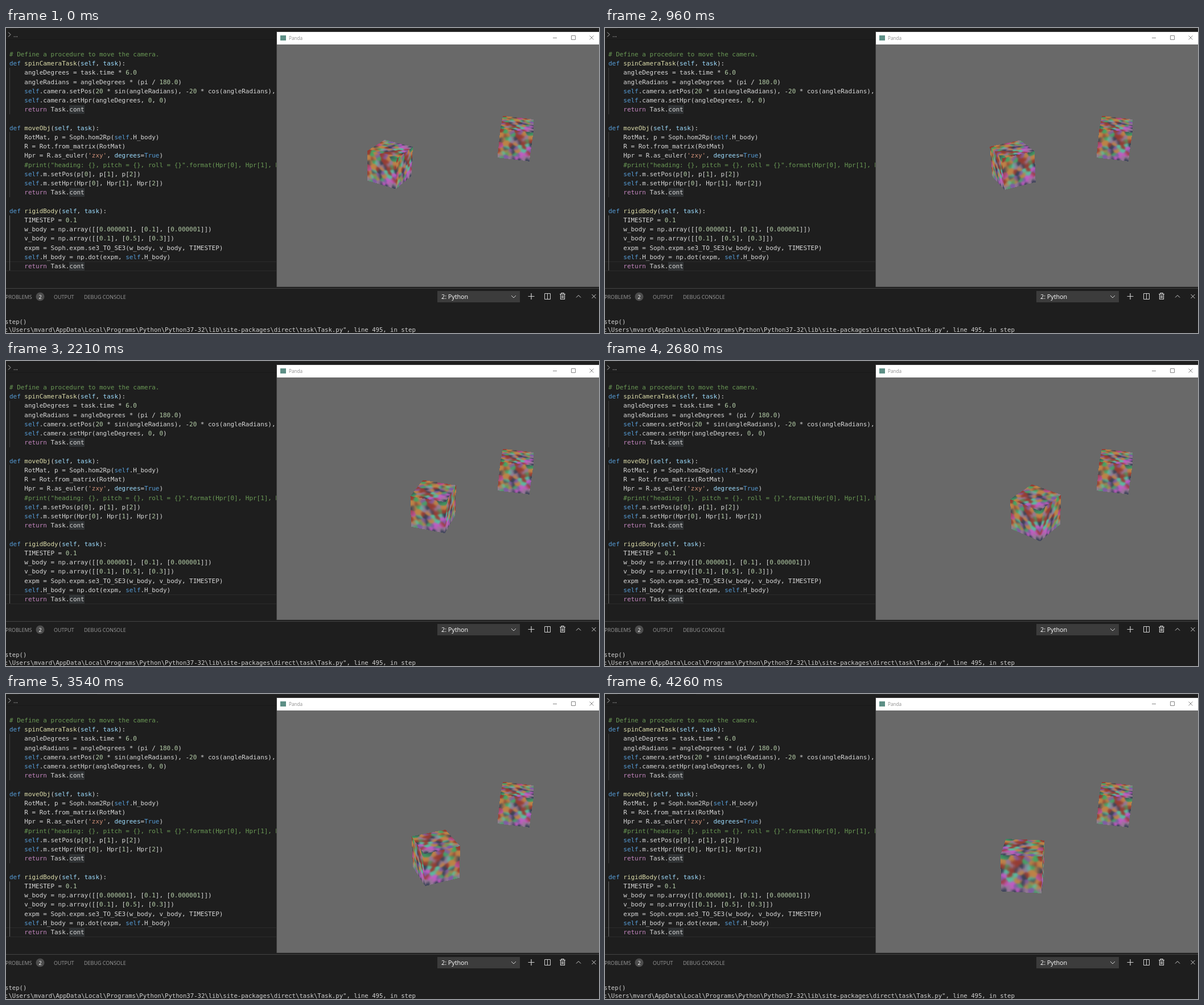
Recreate the animation shown at these times as an HTML page with a canvas. Size 1042 px wide and 537 px high, loop 4.33 s.

```html
<!DOCTYPE html>
<html lang="en">
<head>
<meta charset="utf-8">
<title>Rigid body motion</title>
<style>
html, body { margin: 0; width: 100%; height: 100%; overflow: hidden; background: #1e1e1e; }
canvas { display: block; width: 1042px; height: 537px; }
</style>
</head>
<body>
<canvas id="stage" width="1042" height="537"></canvas>
<script>
const ctx = document.getElementById('stage').getContext('2d');
const MONO = '"DejaVu Sans Mono", "Noto Sans Mono", monospace';
const SANS = '"Open Sans", "Noto Sans", sans-serif';
const GREY = '#696969';

function rect(x, y, w, h, color) {
  ctx.fillStyle = color;
  ctx.fillRect(x, y, w, h);
}

function text(str, x, y, size, color, family = SANS) {
  ctx.font = `${size}px ${family}`;
  ctx.fillStyle = color;
  ctx.fillText(str, x, y);
}

function stroke(path, color, width = 1) {
  ctx.strokeStyle = color;
  ctx.lineWidth = width;
  ctx.stroke(new Path2D(path));
}

// ---- Editor ----
const CODE = `# Define a procedure to move the camera.
def spinCameraTask(self, task):
    angleDegrees = task.time * 6.0
    angleRadians = angleDegrees * (pi / 180.0)
    self.camera.setPos(20 * sin(angleRadians), -20 * cos(angleRadians), 3)
    self.camera.setHpr(angleDegrees, 0, 0)
    return Task.cont

def moveObj(self, task):
    RotMat, p = Soph.hom2Rp(self.H_body)
    R = Rot.from_matrix(RotMat)
    Hpr = R.as_euler('zxy', degrees=True)
    #print("heading: {}, pitch = {}, roll = {}".format(Hpr[0], Hpr[1], Hpr[2]))
    self.m.setPos(p[0], p[1], p[2])
    self.m.setHpr(Hpr[0], Hpr[1], Hpr[2])
    return Task.cont

def rigidBody(self, task):
    TIMESTEP = 0.1
    w_body = np.array([[0.000001], [0.1], [0.000001]])
    v_body = np.array([[0.1], [0.5], [0.3]])
    expm = Soph.expm.se3_TO_SE3(w_body, v_body, TIMESTEP)
    self.H_body = np.dot(expm, self.H_body)
    return Task.cont`.split('\n');

const CODE_SIZE = 10.95, LEFT = 6, BASE = 50, LEADING = 16.22;
const TOKEN = /#.*|'[^']*'|\w+(?:\.\d+)?(?=\W|$)|\s+|[^\w\s]/g;

function tokenColor(tok, prev, inDef) {
  if (tok[0] === '#') return '#6a9955';
  if (tok[0] === "'") return '#ce9178';
  if (/^\d/.test(tok)) return '#b5cea8';
  if (tok === 'return') return '#c586c0';
  if (prev === 'def') return '#dcdcaa';
  if (tok === 'degrees' || inDef && /^(self|task)$/.test(tok)) return '#9cdcfe';
  if (/^(def|self|True)$/.test(tok)) return '#569cd6';
  return '#d8d8d8';
}

function drawCode() {
  ctx.font = `${CODE_SIZE}px ${MONO}`;
  const advance = ctx.measureText('0'.repeat(100)).width / 100;
  CODE.forEach((line, row) => {
    const y = Math.round(BASE + row * LEADING);
    if (line.endsWith('Task.cont')) rect(111, y - 11, 27, 15, '#303335');
    let prev = '';
    for (const m of line.matchAll(TOKEN)) {
      const tok = m[0];
      if (!tok.trim()) continue;
      text(tok, LEFT + m.index * advance, y, CODE_SIZE,
        tokenColor(tok, prev, line.startsWith('def')), MONO);
      prev = tok;
    }
  });
}

function drawEditor() {
  rect(0, 0, 1042, 537, '#1e1e1e');
  rect(0, 0, 22, 1, '#252526');
  rect(160, 0, 882, 1, '#252526');
  rect(0, 20, 476, 1, '#191919');
  stroke('M4 7.5 L8 11.5 L4 15.5', '#b8b8b8');
  text('...', 13, 16, 10, '#c0c0c0');
  rect(0, 411, 476, 1, '#2b2b2b');
  rect(0, 427, 476, 1, '#2b2b2b');
  rect(6, 70, 1, 82, '#404040');
  rect(6, 183, 1, 115, '#404040');
  rect(6, 330, 1, 97, '#6a6a6a');
  drawCode();
}

// ---- Bottom panel ----
function drawPanel() {
  rect(0, 458, 1042, 1, '#434343');
  const tab = '#9c9c9c';
  text('PROBLEMS', -1, 477, 9, tab);
  text('OUTPUT', 84, 477, 9, tab);
  text('DEBUG CONSOLE', 137, 477, 9, tab);
  ctx.fillStyle = '#4d4d4d';
  ctx.beginPath();
  ctx.arc(60, 473, 7.5, 0, 7);
  ctx.fill();
  text('2', 57.4, 476.5, 9, '#ffffff');

  rect(758, 463, 145, 20, '#3c3c3c');
  text('2: Python', 765, 477, 10.75, '#ffffff');
  const icon = '#d0d0d0';
  stroke('M888 471 L892 475 L896 471', icon);
  stroke('M923 467 V478 M917.5 472.5 H928.5', icon, 1.2);
  stroke('M946.5 467.5 H956.5 V477.5 H946.5 Z M951.5 467 V478', icon);
  stroke('M973 468.5 H983 M976 468 V466.5 H980 V468 M974.5 469 V477.5 H981.5 V469 M977 470.5 V476 M979 470.5 V476', icon, 1.2);
  stroke('M1002 474.5 L1006 470.5 L1010 474.5', icon);
  stroke('M1029.5 469 L1036.5 476 M1036.5 469 L1029.5 476', icon);

  text('step()', -2, 521, 10.62, '#d0d0d0', MONO);
  text(':\\Users\\mvard\\AppData\\Local\\Programs\\Python\\Python37-32\\lib\\site-packages\\direct\\task\\Task.py", line 495, in step',
    -2, 535, 10.62, '#d0d0d0', MONO);
}

// ---- 3D window ----
function drawWindow() {
  rect(475, 6, 567, 450, '#3a3a3a');
  rect(476, 7, 566, 449, GREY);
  rect(476, 7, 566, 22, '#ffffff');
  rect(476, 455, 566, 1, '#565656');
  rect(482, 13, 10, 9, '#5d8f86');
  text('Panda', 497, 20.5, 8.2, '#8c8c8c');
  const btn = '#858585';
  stroke('M961 17.5 H968', btn);
  stroke('M993.5 13.5 H1000.5 V20.5 H993.5 Z', btn);
  stroke('M1025.5 13.5 L1032.5 20.5 M1032.5 13.5 L1025.5 20.5', btn);
}

// ---- Texture of soft coloured blobs ----
const TEX = 128, BLOBS = 9;
const PALETTE = [
  [85, 190, 160], [65, 165, 100], [195, 90, 195], [130, 90, 165],
  [150, 60, 50], [190, 130, 70], [55, 65, 85], [150, 120, 150]
];

function random(seed) {
  return () => {
    seed = (seed * 1664525 + 1013904223) >>> 0;
    return seed / 4294967296;
  };
}

function makeTexture() {
  const rnd = random(77);
  const blobs = Array.from({ length: BLOBS * BLOBS }, (_, i) => ({
    x: i % BLOBS + rnd(),
    y: Math.floor(i / BLOBS) + rnd(),
    color: PALETTE[Math.floor(rnd() * PALETTE.length)]
  }));
  const tex = new Uint8ClampedArray(TEX * TEX * 3);
  for (let p = 0; p < TEX * TEX; p++) {
    const x = (p % TEX) * BLOBS / TEX, y = Math.floor(p / TEX) * BLOBS / TEX;
    const sum = [0, 0, 0];
    let total = 0;
    for (const b of blobs) {
      const weight = Math.exp(-3 * ((x - b.x) ** 2 + (y - b.y) ** 2));
      total += weight;
      b.color.forEach((c, ch) => sum[ch] += c * weight);
    }
    sum.forEach((c, ch) => tex[p * 3 + ch] = c / total);
  }
  return tex;
}

const texture = makeTexture();

// ---- Cube, cast pixel by pixel ----
const BOX = 128, EYE = 780;
const patch = ctx.createImageData(BOX, BOX);

function cubeAxes(yaw, pitch, roll) {
  const rad = Math.PI / 180;
  const c = Math.cos(yaw * rad), s = Math.sin(yaw * rad);
  const p = Math.cos(pitch * rad), q = Math.sin(pitch * rad);
  const cr = Math.cos(roll * rad), sr = Math.sin(roll * rad);
  return [[c, q * s, p * s], [s, -q * c, -p * c], [0, p, -q]]
    .map(([x, y, z]) => [x * cr - y * sr, x * sr + y * cr, z]);
}

function drawCube([cx, cy, size, yaw, pitch, roll]) {
  const axes = cubeAxes(yaw, pitch, roll);
  const x0 = Math.round(cx) - BOX / 2, y0 = Math.round(cy) - BOX / 2;
  const from = axes.map(a => a[2] * EYE / size);
  const dir = [0, 0, 0];
  const texel = c => Math.min(TEX - 1, Math.max(0, Math.floor((c + 0.5) * TEX)));
  const data = patch.data;
  for (let n = 0; n < BOX * BOX; n++) {
    const dx = x0 + n % BOX + 0.5 - cx;
    const dy = y0 + Math.floor(n / BOX) + 0.5 - cy;
    let near = -Infinity, far = Infinity, face = 0;
    for (let i = 0; i < 3; i++) {
      const a = axes[i];
      dir[i] = (dx * a[0] + dy * a[1] - EYE * a[2]) / size || 1e-9;
      const k1 = (-0.5 - from[i]) / dir[i], k2 = (0.5 - from[i]) / dir[i];
      const enter = Math.min(k1, k2);
      if (enter > near) { near = enter; face = i; }
      far = Math.min(far, Math.max(k1, k2));
    }
    const o = n * 4;
    data[o] = data[o + 1] = data[o + 2] = 105;
    data[o + 3] = 255;
    if (near > far) continue;
    const hit = i => from[i] + dir[i] * near;
    const u = texel(hit(face === 0 ? 1 : 0)), v = texel(hit(face === 2 ? 1 : 2));
    const t = (v * TEX + u) * 3;
    for (let ch = 0; ch < 3; ch++) data[o + ch] = texture[t + ch];
  }
  ctx.putImageData(patch, x0, y0);
}

// ---- Motion ----
const LOOP = 4330;
const STILL = [896, 194, 55.5, 90, 26, 6.8];

// time, x, y, size, yaw, pitch, roll
const KEYS = [
  [0, 674.8, 239, 57.5, 29.5, 26, 1.5],
  [960, 716.3, 240, 59, 68.5, 24.5, -3.5],
  [1440, 732.4, 244, 60.5, 83.4, 23.5, -1.5],
  [2210, 751.7, 255.5, 62, 109.3, 31, 0],
  [3150, 758.7, 278, 63.3, 144.7, 34, -1.2],
  [3870, 748.3, 294.7, 66, 171.7, 28.5, -0.9],
  [4260, 734.7, 302, 69.5, 186, 26, 0]
];

function slope(k, c) {
  const a = KEYS[Math.max(0, k - 1)], b = KEYS[Math.min(KEYS.length - 1, k + 1)];
  return (b[c] - a[c]) / (b[0] - a[0]);
}

function poseAt(t) {
  let k = 0;
  while (k < KEYS.length - 2 && t >= KEYS[k + 1][0]) k++;
  const a = KEYS[k], b = KEYS[k + 1], span = b[0] - a[0];
  const f = Math.min(1, (t - a[0]) / span), g = 1 - f;
  return [1, 2, 3, 4, 5, 6].map(c =>
    a[c] * g * g * (1 + 2 * f) + b[c] * f * f * (1 + 2 * g) +
    span * f * g * (slope(k, c) * g - slope(k + 1, c) * f));
}

// The picture advances in discrete steps: start of each run and its step count.
const RUNS = [[0, 9], [650, 7], [1200, 7], [1750, 7], [2280, 7], [2830, 7], [3380, 7], [3940, 5]];

const STEPS = RUNS.flatMap(([start, count], i) => {
  const end = i + 1 < RUNS.length ? RUNS[i + 1][0] : LOOP;
  return Array.from({ length: count },
    (_, n) => Math.floor((start + n * (end - start) / count) / 10) * 10);
});

let shown = -1;

function render(now) {
  const t = now % LOOP;
  const step = STEPS.findLast(s => s <= t);
  if (step !== shown) {
    shown = step;
    rect(600, 150, 232, 240, GREY);
    drawCube(poseAt(step));
  }
  requestAnimationFrame(() => render(performance.now() - began));
}

drawEditor();
drawPanel();
drawWindow();
drawCube(STILL);
const began = performance.now();
render(0);
</script>
</body>
</html>
```
